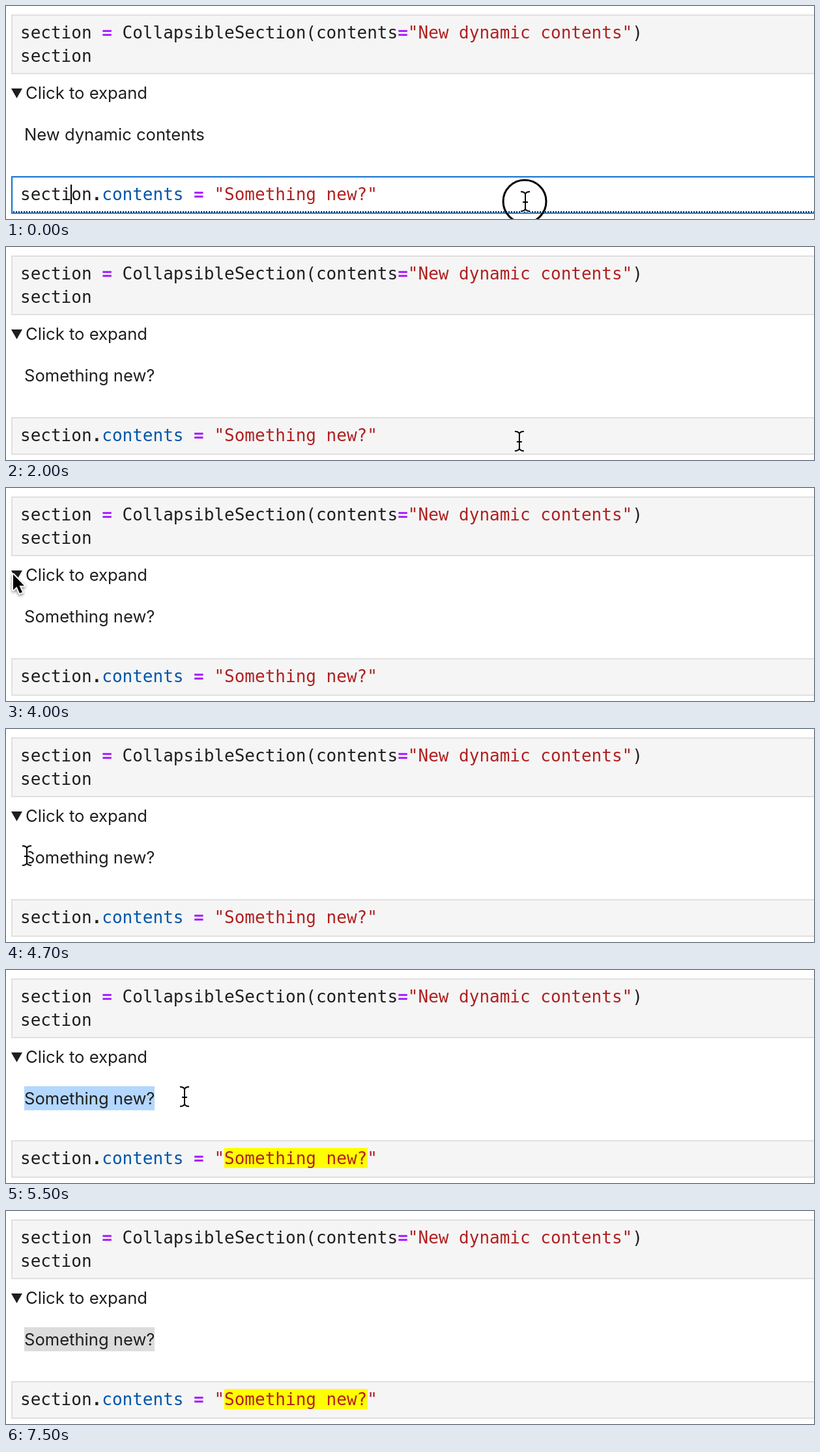
These frames come from a looping animation (1240x328 px, 7.6 s). An HTML page with a canvas:

```html
<!DOCTYPE html>
<html lang="en">
<head>
<meta charset="utf-8">
<title>Collapsible section</title>
<style>
html, body { margin: 0; width: 100%; height: 100%; overflow: hidden; background: #fff; }
canvas { display: block; width: 1240px; height: 328px; }
</style>
</head>
<body>
<canvas id="stage" width="1240" height="328"></canvas>
<script>
const ctx = document.getElementById('stage').getContext('2d');
const W = 1240, H = 328, LOOP = 7600, STEP = 100;
const MONO = '26px "DejaVu Sans Mono", monospace';
const SANS = '25.6px Inter, sans-serif';
const INK = '#1e1e1e', PURPLE = '#aa22ff', RED = '#b02020', BLUE = '#0055aa';
const CODE_X = 22, PROSE_X = 28, CELL_Y = 262, COLLAPSE = 69;
const OLD = 'New dynamic contents', NEW = 'Something new?';

// Moments of the story, in ms
const RUN = 900, UPDATE = 1400, WAKE = 1900, CLOSE = 2700, OPEN = 3200;
const PRESS = 4800, RELEASE = 5500, GONE = 6700, BLUR = 7200;

// Token text, colour and weight
const LINE_1 = [
  ['section ', INK], ['=', PURPLE, true], [' CollapsibleSection(contents', INK],
  ['=', PURPLE, true], ['"' + OLD + '"', RED], [')', INK]
];
const LINE_2 = [['section', INK]];
const LINE_3 = [
  ['section', INK], ['.', INK, true], ['contents', BLUE], [' ', INK],
  ['=', PURPLE, true], [' ', INK], ['"' + NEW + '"', RED]
];

// Each move eases from the previous resting point to (x, y)
const REST = { x: 797, y: 301 };
const MOVES = [
  { start: WAKE, end: 2600, x: 12, y: 139 },
  { start: 2900, end: OPEN, x: 11, y: 133 },
  { start: 4000, end: 4700, x: 32, y: 195 },
  { start: 4900, end: RELEASE, x: 274, y: 195 },
  { start: RELEASE, end: 6200, x: 366, y: 313 },
  { start: 6300, end: GONE, x: 384, y: 350 }
];

const clamp = v => Math.min(1, Math.max(0, v));
const ease = k => k < 0.5 ? 4 * k ** 3 : 1 - 4 * (1 - k) ** 3;

function pointerAt(t) {
  let { x, y } = REST;
  for (const m of MOVES) {
    const k = ease(clamp((t - m.start) / (m.end - m.start)));
    x += (m.x - x) * k;
    y += (m.y - y) * k;
  }
  return { x, y };
}

function proseWidth(text) {
  ctx.font = SANS;
  return ctx.measureText(text).width;
}

// Characters of NEW that the drag has covered
function dragged(t) {
  if (t < PRESS) return '';
  const x = t < RELEASE ? pointerAt(t).x : W;
  let n = 0;
  while (n < NEW.length) {
    const middle = (proseWidth(NEW.slice(0, n)) + proseWidth(NEW.slice(0, n + 1))) / 2;
    if (PROSE_X + middle > x) break;
    n++;
  }
  return NEW.slice(0, n);
}

function rect(x, y, w, h, color) {
  ctx.fillStyle = color;
  ctx.fillRect(x, y, w, h);
}

function poly(points, color) {
  ctx.beginPath();
  points.forEach(([x, y]) => ctx.lineTo(x, y));
  ctx.closePath();
  ctx.fillStyle = color;
  ctx.fill();
}

function prose(text, x, y) {
  ctx.font = SANS;
  ctx.fillStyle = INK;
  ctx.fillText(text, x, y);
}

function code(tokens, y, match) {
  ctx.font = MONO;
  const advance = ctx.measureText('0').width;
  const colX = col => CODE_X + col * advance;
  if (match) {
    const line = tokens.map(token => token[0]).join('').toLowerCase();
    const word = match.toLowerCase();
    for (let i = line.indexOf(word); i >= 0; i = line.indexOf(word, i + 1)) {
      const left = Math.floor(colX(i));
      rect(left, y - 25, Math.ceil(colX(i + word.length)) - left, 31, '#ffff00');
    }
  }
  let col = 0;
  for (const [text, color, bold] of tokens) {
    ctx.font = (bold ? 'bold ' : '') + MONO;
    ctx.fillStyle = color;
    ctx.fillText(text, colX(col), y);
    col += text.length;
  }
}

function cellBox(y, h, focused) {
  rect(8, y, W, h, focused ? '#1976d2' : '#e0e0e0');
  rect(10, y + 2, W, h - 4, focused ? '#fff' : '#f5f5f5');
  if (!focused) return;
  rect(10, y + 2, W, 1, '#dcecfa');
  rect(10, y + 2, 1, h - 4, '#dcecfa');
  for (let x = 11; x < W; x += 4) rect(x, y + h - 4, 2, 2, INK);
}

function triangle(open) {
  poly(open ? [[8, 127], [25, 127], [16.5, 142]] : [[8, 126], [23, 134], [8, 142]], INK);
}

function arrow(x, y) {
  const shape = [[0, 0], [0, 24], [5.5, 19], [10, 29], [14, 27.5], [9.5, 17.5], [17, 17.5]];
  ctx.save();
  ctx.translate(x, y);
  ctx.lineJoin = 'round';
  ctx.lineWidth = 4;
  ctx.strokeStyle = '#fff';
  ctx.shadowColor = 'rgba(0,0,0,.4)';
  ctx.shadowBlur = 4;
  ctx.shadowOffsetY = 2;
  poly(shape, '#000');
  ctx.stroke();
  ctx.shadowColor = 'transparent';
  poly(shape, '#000');
  ctx.restore();
}

function iBeam(x, y) {
  ctx.save();
  ctx.translate(x, y);
  ctx.beginPath();
  for (const s of [-15, 15]) {
    ctx.moveTo(-7, s);
    ctx.quadraticCurveTo(-1, s, 0, s * 0.75);
    ctx.quadraticCurveTo(1, s, 7, s);
  }
  ctx.moveTo(0, -12);
  ctx.lineTo(0, 12);
  ctx.moveTo(-4, 1);
  ctx.lineTo(4, 1);
  for (const [width, color] of [[4.5, '#fff'], [2, '#000']]) {
    ctx.lineWidth = width;
    ctx.strokeStyle = color;
    ctx.stroke();
  }
  ctx.restore();
}

function ring(x, y) {
  ctx.beginPath();
  ctx.arc(x, y, 33, 0, Math.PI * 2);
  ctx.lineWidth = 3;
  ctx.strokeStyle = '#000';
  ctx.stroke();
}

function pointer(t) {
  if ((t >= RUN && t < WAKE) || t >= GONE) return;
  const { x, y } = pointerAt(t);
  const pressed = t < 200 || (t >= PRESS && t < RELEASE);
  if (pressed) ring(x - 1, y);
  (y >= CELL_Y || t >= 4400 ? iBeam : arrow)(x, y);
}

function draw(t) {
  const open = t < CLOSE || t >= OPEN;
  const focused = t < RUN;
  const lift = open ? 0 : COLLAPSE;
  // Selection trails the pointer; matching trails the selection.
  const selected = dragged(t - STEP);
  const match = dragged(t - 2 * STEP);

  rect(0, 0, W, H, '#fff');
  cellBox(13, 92, false);
  code(LINE_1, 50, match);
  code(LINE_2, 86, match);

  triangle(open);
  prose('Click to expand', 30, 143);
  if (open) {
    const color = t < BLUR ? '#b3d7ff' : '#dcdcdc';
    rect(PROSE_X, 179, Math.round(proseWidth(selected)), 37, color);
    prose(t < UPDATE ? OLD : NEW, PROSE_X, 207);
  }

  cellBox(CELL_Y - lift, 58, focused);
  code(LINE_3, 299 - lift, match);
  cellBox(CELL_Y + 78 - lift, 58, false);

  if (focused && t < 600) rect(t < STEP ? 99 : 568, 275, 2, 30, '#000');
  pointer(t);
}

function frame(now) {
  draw(Math.floor(now % LOOP / STEP) * STEP);
  requestAnimationFrame(frame);
}

draw(0);
requestAnimationFrame(frame);
</script>
</body>
</html>
```
